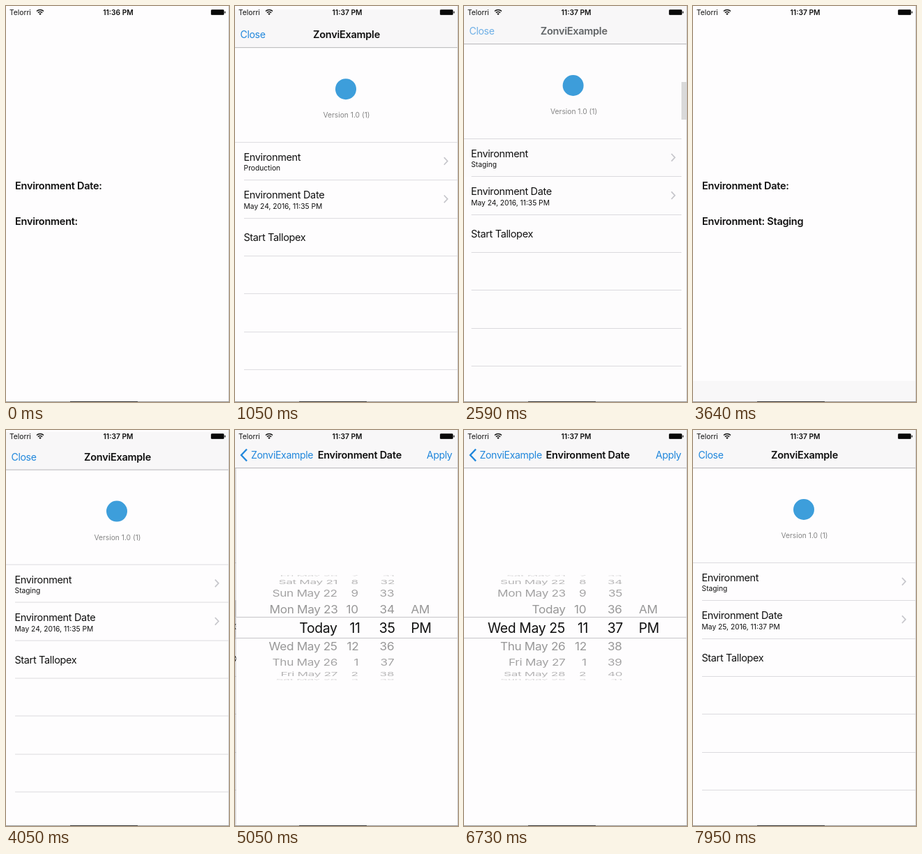
These frames come from a looping animation (320 by 568 pixels, 8000 ms). An HTML page:

```html
<!DOCTYPE html>
<html lang="en">
<head>
<meta charset="utf-8">
<title>Debug menu</title>
<style>
html, body { margin: 0; width: 100%; height: 100%; overflow: hidden; background: #fefdfe; }
#stage {
  position: relative; width: 320px; height: 568px; overflow: hidden; background: #fefdfe;
  font: 14.5px/20px Inter, Roboto, sans-serif; letter-spacing: -.024em; color: #101010;
  --m: 1; --p: 0; --f: 0;
}
#stage div, #stage svg { position: absolute; }
.full { left: 0; top: 0; width: 320px; height: 568px; }
/* --x is the left edge, --y the middle of the capitals */
p { position: absolute; margin: -10px 0 0; left: var(--x, 0); top: var(--y); white-space: nowrap; }
.bold { font-weight: 600; letter-spacing: -.018em; }
.small { font-size: 10.24px; letter-spacing: 0; }
.mid { width: 320px; text-align: center; }
.blue { color: #2087dc; font-size: 14.1px; }
.line { left: 0; right: 0; height: 1px; background: #dcdbdf; }
.hl { left: 0; width: 320px; height: 54px; background: #d9d9d9; }

#modal { transform: translateY(calc(var(--m) * 568px)); background: #fefdfe; }
#menu { background: #fefdfe; transform: translateX(calc(var(--p) * -96px)); }
#dim { background: #000; opacity: calc(var(--p) * .1); }
#detail {
  background: #fefdfe; box-shadow: 0 0 9px rgba(0, 0, 0, calc(var(--p) * .2));
  transform: translateX(calc((1 - var(--p)) * 320px));
}
#logo { left: 144px; top: 99px; width: 30px; height: 30px; border-radius: 50%; background: #3d9edb; }
.chev { fill: none; stroke: #c7c7cc; stroke-width: 1.7; }

#nav { left: 0; top: 0; width: 320px; height: 54px; background: #f8f7f8; border-bottom: 1px solid #b8b7ba; }
#close { opacity: calc(1 - var(--f)); }
#root { opacity: calc(1 - var(--f)); transform: translateX(calc(var(--p) * -90px)); }
#back { opacity: calc(var(--f) * var(--f) * var(--f)); transform: translateX(calc((1 - var(--p)) * 90px)); }
#arrow { opacity: calc(var(--p) * var(--p) * var(--p) * var(--p)); }
#title { opacity: var(--f); transform: translateX(calc((1 - var(--p)) * 229px)); }
#apply { opacity: var(--f); }
.env .onDate, .date .onEnv { display: none; }

#drum { left: 0; top: 208px; width: 320px; height: 151px; overflow: hidden; font-size: 17.2px; }
#lens {
  left: 0; top: 268px; width: 320px; height: 29px; overflow: hidden; background: #fefdfe;
  border: solid #c6c5c8; border-width: 1px 0; font-size: 19.4px;
}
#drum span, #lens span { position: absolute; top: 50%; margin-top: -10px; white-space: nowrap; }
</style>
</head>
<body>
<div id="stage" class="env">
  <p class="bold" style="--x:13px;--y:258px">Environment Date:</p>
  <p class="bold" style="--x:13px;--y:309px">Environment: <span id="homeEnv"></span></p>

  <div id="modal" class="full">
    <div id="menu" class="full">
      <div id="logo"></div>
      <p class="mid small" style="--y:150.5px;color:#858585">Version 1.0 (1)</p>
      <div id="picked" class="hl"></div>
      <div class="line" style="top:190px"></div>
      <p style="--x:12.4px;--y:212px">Environment</p>
      <p class="small" id="envValue" style="--x:12.6px;--y:227px"></p>
      <p style="--x:12.4px;--y:266px">Environment Date</p>
      <p class="small" id="dateValue" style="--x:12.6px;--y:281.5px"></p>
      <p style="--x:12.4px;--y:326.5px">Start Tallopex</p>
      <svg class="chev" style="left:299px;top:211px" width="9" height="70"><path d="M1 1l5 5.3-5 5.3M1 55.4l5 5.3-5 5.3"/></svg>
    </div>
    <div id="dim" class="full"></div>
    <div id="detail" class="full">
      <div id="options" class="full onEnv">
        <div id="tapped" class="hl" style="top:109px"></div>
        <p style="--x:12.4px;--y:81px">Production</p>
        <p style="--x:12.4px;--y:135.5px">Staging</p>
        <p style="--x:12.4px;--y:190px">QA</p>
      </div>
      <div class="full onDate">
        <div id="drum"></div>
        <div id="lens"></div>
      </div>
    </div>
    <div id="nav">
      <p id="close" class="blue" style="--x:7.5px;--y:36px">Close</p>
      <p id="root" class="bold mid" style="--y:36px">ZonviExample</p>
      <svg id="arrow" style="left:6px;top:26px" width="14" height="20" fill="none" stroke="#2087dc" stroke-width="2.4"><path d="M11 1.5L3 10l8 8.5"/></svg>
      <p id="back" class="blue" style="--x:22.5px;--y:36px">ZonviExample</p>
      <p id="title" class="bold" style="--x:117.5px;--y:36px"></p>
      <p id="apply" class="blue onDate" style="--x:275px;--y:36px">Apply</p>
    </div>
  </div>

  <p class="small" style="--x:5px;--y:9px">Telorri</p>
  <svg style="left:42.5px;top:4px" width="12" height="10" fill="none" stroke="#111" stroke-width="1.5"><path d="M1 3.6a7 7 0 0 1 10 0M2.9 5.7a4.4 4.4 0 0 1 6.2 0"/><path d="M6 9L4.3 7.2a2.4 2.4 0 0 1 3.4 0z" fill="#111" stroke="none"/></svg>
  <p id="clock" class="mid small bold" style="--x:1px;--y:9px;letter-spacing:0"></p>
  <svg style="left:293px;top:4px" width="23" height="10"><rect x="1" y="1" width="19" height="8" rx="1.6" fill="#333"/><rect x="1.8" y="1.8" width="17.4" height="6.4" rx=".8" fill="#080808"/><rect x="20.6" y="3.5" width="1.3" height="3" rx=".6" fill="#111"/></svg>
  <div style="left:319px;top:0;width:1px;height:568px;background:#d2d1d3"></div>
  <div style="left:0;top:567px;width:320px;height:1px;background:linear-gradient(90deg,#a0a0a0 92px,#333 92px 189px,#999 189px)"></div>
</div>

<script>
const LOOP = 8000;
const $ = id => document.getElementById(id);
const stage = $('stage');
const clamp = x => Math.min(1, Math.max(0, x));
const spring = ms => {
  const x = Math.max(0, ms) * .0175;
  return x > 10.5 ? 1 : 1 - (1 + x) * Math.exp(-x);
};
const smooth = (t, from, to) => (1 - Math.cos(Math.PI * clamp((t - from) / (to - from)))) / 2;
const setText = (id, s) => { if ($(id).textContent !== s) $(id).textContent = s; };

function addLines(parent, top, count) {
  for (let k = 1; k <= count; k++) {
    const line = document.createElement('div');
    line.className = 'line';
    line.style.cssText = `left:13px;top:${Math.round(top + 54.37 * k)}px`;
    parent.append(line);
  }
}
addLines($('menu'), 190, 6);
addLines($('options'), 54, 9);

const WEEK = ['Tue', 'Wed', 'Thu', 'Fri', 'Sat', 'Sun', 'Mon'];
const wheels = [
  { edge: 145.5, lensEdge: 145, from: -5, to: 6, label: i => i ? `${WEEK[(i + 7) % 7]} May ${24 + i}` : 'Today' },
  { edge: 175.5, lensEdge: 178, from: -5, to: 5, label: i => (i + 10) % 12 + 1 },
  { edge: 227, lensEdge: 228, from: -5, to: 7, label: i => 35 + i },
  { edge: 278, lensEdge: 280, from: -1, to: 0, label: i => i ? 'AM' : 'PM' }
];

function addRow(parent, edge, text) {
  const row = document.createElement('span');
  row.textContent = text;
  row.style.right = 320 - edge + 'px';
  parent.append(row);
  return row;
}
for (const w of wheels) {
  w.rows = [];
  for (let i = w.from; i <= w.to; i++)
    w.rows.push({ i, far: addRow($('drum'), w.edge, w.label(i)), near: addRow($('lens'), w.lensEdge, w.label(i)) });
}

// Rows sit on a cylinder; the lens shows the middle one enlarged.
function turn(wheel, value) {
  for (const { i, far, near } of wheel.rows) {
    const d = i - value, angle = d * .361, depth = Math.max(0, Math.cos(angle));
    far.style.transform = `translateY(${75 * Math.sin(angle)}px) scaleY(${depth})`;
    far.style.opacity = Math.abs(d) > 4.3 ? 0 : .44 * Math.sqrt(depth);
    near.style.transform = `translateY(${30 * d}px)`;
  }
}

const visits = {
  env: { push: 1674, pop: 2272, title: 'Environment', rowTop: 191 },
  date: { push: 4627, pop: 7215, title: 'Environment Date', rowTop: 245 }
};

function draw(t) {
  const page = t < 3600 ? 'env' : 'date';
  const { push, pop, title, rowTop } = visits[page];
  const leaving = t >= pop;
  const p = leaving ? 1 - spring(t - pop) : spring(t - push);
  const f = leaving ? 1 - clamp((t - pop) / 500) : clamp((t - push) / 180);
  const m = t < 2700 ? 1 - spring(t - 665)
    : t < 3600 ? smooth(t, 2785, 3190)
    : 1 - spring(t - 3620);

  stage.className = page;
  stage.style.setProperty('--m', m.toFixed(5));
  stage.style.setProperty('--p', p.toFixed(5));
  stage.style.setProperty('--f', f.toFixed(4));
  $('detail').style.visibility = p > 0 ? 'visible' : 'hidden';

  $('picked').style.top = rowTop + 'px';
  $('picked').style.opacity = leaving ? p : +(t >= push - 80);
  $('tapped').style.opacity = +(t >= 2190);

  setText('title', title);
  setText('clock', t < 1000 ? '11:36 PM' : '11:37 PM');
  setText('homeEnv', t < 2250 ? '' : 'Staging');
  setText('envValue', t < 2250 ? 'Production' : 'Staging');
  setText('dateValue', t < 7100 ? 'May 24, 2016, 11:35 PM' : 'May 25, 2016, 11:37 PM');

  turn(wheels[0], smooth(t, 5270, 5980));
  turn(wheels[1], 0);
  turn(wheels[2], 2 * smooth(t, 6060, 6720));
  turn(wheels[3], 0);
}

function tick() {
  draw(performance.now() % LOOP);
  requestAnimationFrame(tick);
}
tick();
</script>
</body>
</html>
```
